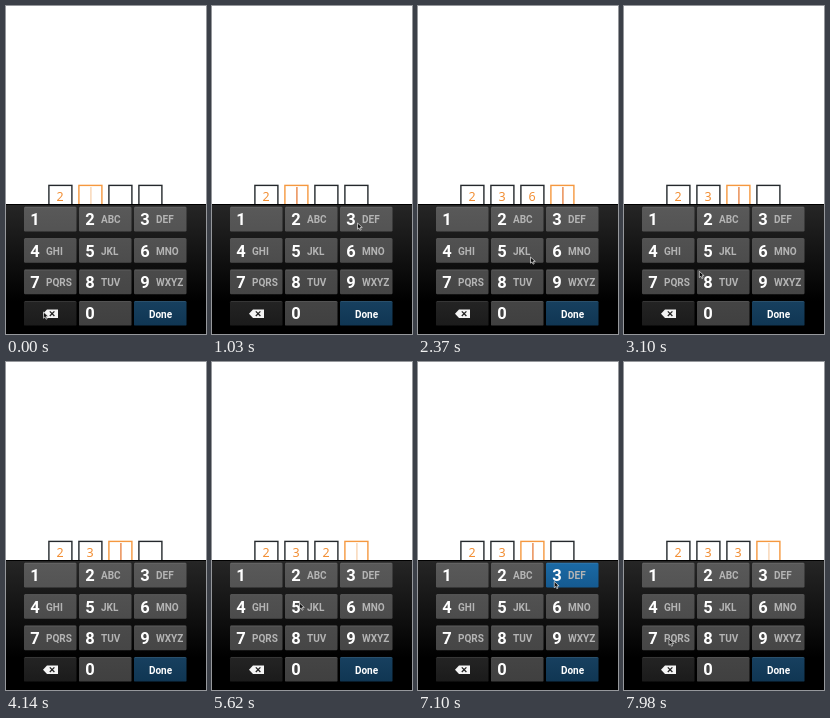
Write an HTML page that moves like this. It is 200 by 328 pixels and loops after 8 s.

```html
<!DOCTYPE html>
<html lang="en">
<head>
<meta charset="utf-8">
<title>PIN entry</title>
<style>
  html, body { margin: 0; width: 100%; height: 100%; overflow: hidden; background: #fff; }
  svg { display: block; width: 100%; height: 100%; }
  .pin { font: 12.5px "Noto Sans", "Open Sans", sans-serif; fill: #f28f35; text-anchor: middle; }
  .digit { font: 700 16.5px Roboto, sans-serif; fill: #fff; }
  .letters { font: 700 10px Roboto, sans-serif; fill: #b4b4b4; }
  .done { font: 700 10px Roboto, sans-serif; fill: #fff; text-anchor: middle; }
</style>
</head>
<body>
<svg viewBox="0 0 200 328">
  <defs>
    <linearGradient id="board" x2="0" y2="1">
      <stop stop-color="#262626"/><stop offset=".5" stop-color="#0d0d0d"/><stop offset=".75" stop-color="#000"/>
    </linearGradient>
    <linearGradient id="key" gradientUnits="userSpaceOnUse" x1="0" x2="0" y1="201" y2="320">
      <stop stop-color="#595959"/><stop offset=".5" stop-color="#4b4b4b"/><stop offset="1" stop-color="#404040"/>
    </linearGradient>
    <linearGradient id="dark" x2="0" y2="1"><stop stop-color="#242424"/><stop offset="1" stop-color="#1b1b1b"/></linearGradient>
    <linearGradient id="blue" x2="0" y2="1"><stop stop-color="#17405f"/><stop offset="1" stop-color="#103653"/></linearGradient>
    <linearGradient id="pressed" x2="0" y2="1"><stop stop-color="#1b6aa5"/><stop offset="1" stop-color="#155a90"/></linearGradient>
  </defs>
  <g id="boxes"></g>
  <rect y="198" width="200" height="130" fill="url(#board)"/>
  <rect y="198" width="200" height="1"/>
  <g id="keys"></g>
  <path d="M37 307.7l4-4.2h11v8.4H41z" fill="#f4f4f4"/>
  <path d="M43.8 305.4l4.6 4.6m0-4.6l-4.6 4.6" stroke="#222" stroke-width="1.3"/>
  <path id="pointer" d="M0 0v6.2l1.5-1.3 1 2.3 1.2-.5-1-2.3h2.1z" fill="#111" stroke="#e8e8e8" stroke-width=".7"/>
</svg>
<script>
const LOOP = 8000, STEP = 147.85, BLINK = 500;
const $ = id => document.getElementById(id);

function add(parent, tag, attrs, text = "") {
  const el = document.createElementNS("http://www.w3.org/2000/svg", tag);
  for (const name in attrs) el.setAttribute(name, attrs[name]);
  el.textContent = text;
  return parent.appendChild(el);
}

const boxes = [42, 72, 102, 132].map(x => ({
  frame: add($("boxes"), "rect", { x: x + .9, y: 179.4, width: 23, height: 22, fill: "#fff", "stroke-width": 1.4 }),
  digit: add($("boxes"), "text", { x: x + 12.2, y: 195, class: "pin" }),
  caret: add($("boxes"), "rect", { x: x + 12.2, y: 181, width: 1.4, height: 17 })
}));

const labels = ["", "ABC", "DEF", "GHI", "JKL", "MNO", "PQRS", "TUV", "WXYZ"];
const keys = {};
["1", "2", "3", "4", "5", "6", "7", "8", "9", "del", "0", "Done"].forEach((name, i) => {
  const x = 18 + i % 3 * 55, y = 200.8 + Math.floor(i / 3) * 31.4;
  const fill = { del: "url(#dark)", Done: "url(#blue)" }[name] || "url(#key)";
  const face = add($("keys"), "rect", { x, y, width: 52.5, height: 24.6, rx: 1.2, fill });
  add($("keys"), "path", { d: `M${x + 1} ${y + .4}h50.5`, stroke: "#fff", "stroke-opacity": .12, "stroke-width": .8 });
  keys[name] = { face, fill };
  if (name === "Done") add($("keys"), "text", { x: x + 26.5, y: y + 16.5, class: "done" }, name);
  else if (name !== "del") add($("keys"), "text", { x: x + 6.3, y: y + 18.4, class: "digit" }, name);
  if (labels[i]) add($("keys"), "text", { x: x + 22, y: y + 16.3, class: "letters" }, labels[i]);
});

// [step, entered code]
const entries = [[0.2, "2"], [10, "23"], [14, "236"], [19, "23"], [24, "235"],
  [27, "23"], [34, "232"], [41, "23"], [49, "233"]];
// step: key held down
const presses = { 9: "3", 13: "6", 23: "5", 33: "2", 48: "3" };
// [step, x, y]
const path = [[0, 37.5, 306], [2, 38, 306], [7, 145.5, 217], [8, 155, 217], [9, 151, 218],
  [10, 150, 219], [13, 148, 247], [14, 146, 247], [16, 112.5, 251], [18, 46, 302], [19, 46, 302],
  [22, 90, 247], [24, 90, 247], [26, 46, 302], [27, 46, 302], [32, 93, 215], [34, 93, 216],
  [38, 87.5, 241], [40, 49, 287], [41, 44, 301], [43, 45, 301], [47, 136, 220], [49, 136.5, 219],
  [54, 45, 277]];

const latest = (list, step) => list.filter(([at]) => at <= step).pop() || list[0];

function pointerAt(step) {
  const i = path.findIndex(([at]) => at > step);
  if (i < 0) return path[path.length - 1].slice(1);
  const [s, x, y] = path[i - 1], [e, x2, y2] = path[i];
  const k = (step - s) / (e - s);
  return [x + (x2 - x) * k, y + (y2 - y) * k];
}

function draw(time) {
  const step = Math.floor((time + 4) / STEP);
  const [since, code] = latest(entries, step);
  const age = ((step - since) * STEP + 2 * BLINK) % (2 * BLINK);

  boxes.forEach(({ frame, digit, caret }, i) => {
    const focused = i === code.length;
    frame.setAttribute("stroke", focused ? "#f5983f" : "#24282c");
    digit.textContent = code[i] || "";
    caret.setAttribute("fill", age < BLINK ? "#e8874a" : "#f8d5b4");
    caret.setAttribute("opacity", focused ? 1 : 0);
  });

  for (const name in keys) {
    const { face, fill } = keys[name];
    face.setAttribute("fill", presses[step] === name ? "url(#pressed)" : fill);
  }

  $("pointer").setAttribute("transform", `translate(${pointerAt(step)})`);
  $("pointer").setAttribute("opacity", step === 28 ? 0 : 1);
}

const start = performance.now();
function tick(now) {
  draw(Math.max(0, now - start) % LOOP);
  requestAnimationFrame(tick);
}
draw(0);
requestAnimationFrame(tick);
</script>
</body>
</html>
```
